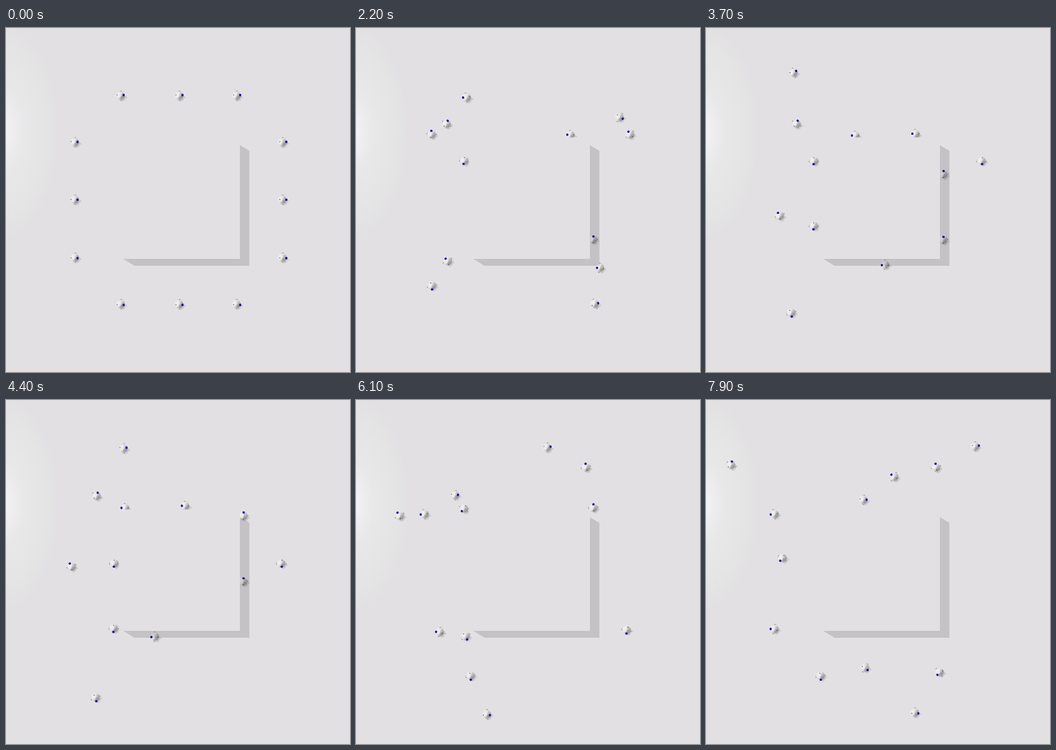
Recreate the animation shown at these times as an HTML page with a canvas. Size 600x599 px, loop 8 s.

```html
<!DOCTYPE html>
<html lang="en">
<head>
<meta charset="utf-8">
<title>Robots circling a block</title>
<style>
  html, body { margin: 0; width: 100%; height: 100%; overflow: hidden; background: #e2e0e3; }
  canvas { display: block; width: 100%; height: 100%; }
</style>
</head>
<body>
<canvas id="stage" width="600" height="599"></canvas>
<script>
const FRAMES = 80, STEP = 100, FLOOR = '#e2e0e3';
const SPEED = 75.5, TURN = 10, START = 0.43, RAMP = 0.25, REACH = 4, DT = 0.01;
const SEEK = 0.75;                                  // pace of a robot that has left its lane
const WEST = 188, NORTH = 185, EAST = 414, SOUTH = 412;   // lanes along the block
const ctx = document.getElementById('stage').getContext('2d');

// Steers from (x, y), facing right, through stops [x, y, pace, rest seconds];
// returns one pose per frame.
function drive(x, y, ...stops) {
  const poses = [], perFrame = Math.round(STEP / 1000 / DT);
  let heading = 0, next = 0, rest = START;
  for (let i = 0; i < FRAMES * perFrame; i++) {
    if (i % perFrame === 0) poses.push([x, y, heading]);
    rest -= DT;
    if (rest > 0 || next === stops.length) continue;
    const [tx, ty, pace = 1, pause = 0] = stops[next];
    const aim = Math.atan2(ty - y, tx - x) - heading;
    const error = Math.atan2(Math.sin(aim), Math.cos(aim));
    heading += Math.max(-TURN * DT, Math.min(TURN * DT, error));
    const ramp = 1 - Math.exp(-(i * DT - START) / RAMP);
    x += Math.cos(heading) * SPEED * pace * ramp * DT;
    y += Math.sin(heading) * SPEED * pace * ramp * DT;
    const last = next === stops.length - 1;
    if (Math.hypot(tx - x, ty - y) < (last || pause ? 1 : REACH)) {
      next++;
      rest = pause;
    }
  }
  return poses;
}

const robots = [
  // Top row
  drive(200, 118, [WEST, 240], [WEST, 420], [200, 481, SEEK]),
  drive(302, 118, [191, 121], [WEST, 190], [190, SOUTH], [310, 487, SEEK]),
  drive(402, 118, [489, 175, .6], [480, 230], [479, 370], [466, 428, SEEK], [390, 488, SEEK]),
  // Left column
  drive(120, 199, [145, 190], [158, 167, 1, 4.45], [300, 176, SEEK]),
  drive(120, 299, [132, 185], [141, 87], [152, 77], [200, 85], [470, 81]),
  drive(120, 400, [134, 455, .44], [157, 520, .44], [168, 548, .44], [198, 548], [470, 542]),
  // Right column
  drive(482, 199, [440, NORTH], [165, 189], [119, 199, SEEK]),
  drive(482, 299, [480, 187], [455, NORTH], [190, NORTH], [100, 328, SEEK]),
  drive(482, 400, [486, SOUTH, .6], [430, 419, .6], [380, SOUTH], [185, SOUTH], [119, 399, SEEK]),
  // Bottom row
  drive(200, 481, [155, 397, SEEK], [91, 229, SEEK], [51, 153, SEEK], [34, 128, SEEK], [55, 95, SEEK]),
  drive(302, 481, [417, 481], [413, 408], [EAST, NORTH], [275, 102, SEEK]),
  drive(402, 481, [EAST, 440], [EAST, 165], [401, 117, SEEK])
];

function shape(fill, ...pts) {
  ctx.fillStyle = fill;
  ctx.beginPath();
  pts.forEach(([x, y]) => ctx.lineTo(x, y));
  ctx.fill();
}

function oval(fill, x, y, rx, ry) {
  ctx.fillStyle = fill;
  ctx.beginPath();
  ctx.ellipse(x, y, rx, ry, 0, 0, 7);
  ctx.fill();
}

function addStops(gradient, stops) {
  stops.forEach(([at, color]) => gradient.addColorStop(at, color));
  return gradient;
}

const bodyFill = addStops(ctx.createLinearGradient(-7, -4, 7, 4),
  [[0, '#f0f0f0'], [.42, '#e0e0e0'], [.62, '#bababa'], [1, '#969698']]);

function drawRobot([x, y, heading]) {
  ctx.save();
  ctx.translate(x, y);
  shape('#cac8cb', [-1, 7], [3, 10], [7, 8], [9, 4], [12, 3.5], [9, 0], [6, -3]);

  ctx.save();
  ctx.rotate(heading);
  for (const side of [-1, 1]) {
    oval('#d2d2d2', 0, side * 7, 3, 2);
    oval('#808083', 1, side * 8.3, 1, .7);
  }
  ctx.restore();

  const rim = Array.from({ length: 10 }, (_, i) => {
    const a = heading + (i + .5) * Math.PI / 5;
    return [7.6 * Math.cos(a), 7.6 * Math.sin(a)];
  });
  shape(bodyFill, ...rim);
  shape('rgba(255,255,255,.4)', [-5, -3], [-1, -5], [1, 0], [-2, 4], [-5, 2]);
  shape('rgba(110,110,112,.25)', [1, 0], [6, 1], [3, 6], [-1, 5]);

  // Raised parts lean away from the middle of the view.
  ctx.translate((x - 300) / 160, (y - 300) / 160);
  ctx.rotate(heading);
  ctx.fillStyle = '#1b128f';
  ctx.beginPath();
  ctx.roundRect(4, -2, 3.6, 4, 1.2);
  ctx.fill();
  oval('#3a3a3d', -5.5, -.4, .8, .8);
  ctx.restore();
}

function drawFloor() {
  ctx.fillStyle = FLOOR;
  ctx.fillRect(0, 0, 600, 599);
  ctx.save();
  ctx.translate(-8, 180);
  ctx.scale(1, 1.87);
  oval(addStops(ctx.createRadialGradient(0, 0, 0, 0, 0, 100),
    [[0, '#f5f4f7'], [.2, '#eeedf0'], [.4, '#e8e8e9'], [.82, '#e4e4e4'], [1, FLOOR]]),
    0, 0, 100, 100);
  ctx.restore();
}

function drawBlock() {
  shape('rgba(0,0,0,.135)', [408, 204], [424.6, 214], [424.6, 414], [224, 414],
    [204.5, 402], [408, 402]);
  ctx.fillStyle = FLOOR;
  ctx.fillRect(197, 190.5, 211, 211.5);
}

function frame(now) {
  const n = Math.floor(now / STEP) % FRAMES;
  drawFloor();
  robots.forEach(poses => drawRobot(poses[n]));
  drawBlock();
  requestAnimationFrame(frame);
}
frame(performance.now());
</script>
</body>
</html>
```
